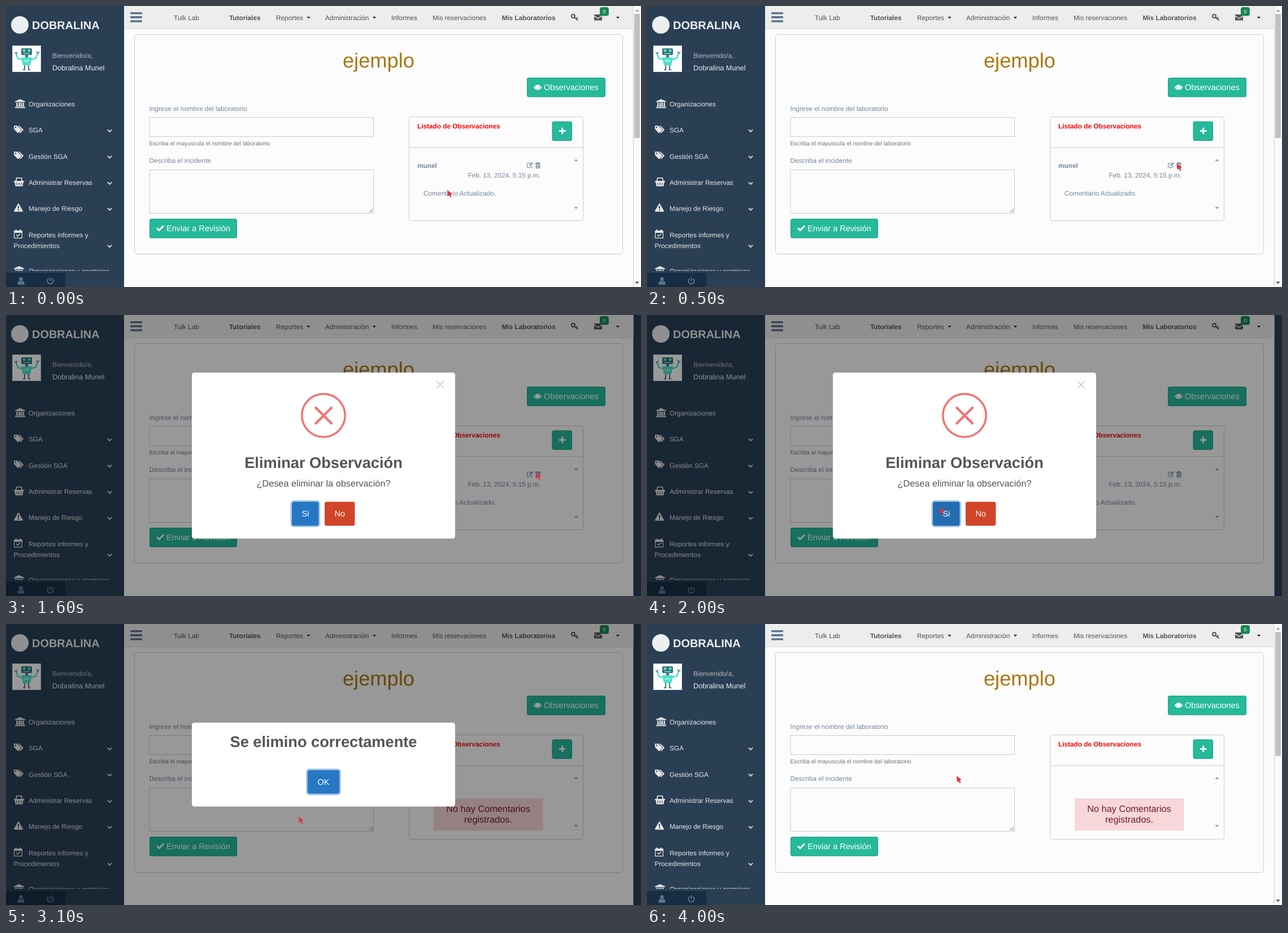
Animation, 1124 px wide and 498 px high, one loop 4.5 s. Source, as an HTML page:

```html
<!DOCTYPE html>
<html lang="es">
<head>
<meta charset="utf-8">
<title>Observaciones</title>
<style>
html, body { margin: 0; width: 100%; height: 100%; overflow: hidden; background: #2a3f54; }
svg { display: block; }
text { font: 11.8px "Liberation Sans", Arial, sans-serif; text-rendering: geometricPrecision; white-space: pre; }
.b { font-weight: bold; }
.mid { text-anchor: middle; }
.muted { fill: #73879c; }
.nav text, .nav path { fill: #515356; }
.menu text, .menu .icon { fill: #e7e7e7; }
.btn rect { fill: #26b99a; stroke: #169f85; }
.btn text { font-size: 14.5px; fill: #fff; }
.line { fill: none; stroke: #ccc; }
.stroke { fill: none; stroke-width: 2; }
.title { font-size: 27.2px; font-weight: bold; fill: #555; text-anchor: middle; }
.body { font-size: 16.3px; text-anchor: middle; }
.choice { font-size: 14.5px; fill: #fff; text-anchor: middle; }
</style>
</head>
<body>
<svg width="1124" height="498" viewBox="0 0 1124 498">
  <defs>
    <path id="bank" fill-rule="evenodd" d="M9 0L18 4V5.3H0V4ZM2.3 6.3H4.7V12H6.2V6.3H8.6V12H9.6V6.3H12V12H13.4V6.3H15.8V12H16.8V13.3H1.2V12H2.3ZM0 14.2H18V16H0Z"/>
    <path id="tags" fill-rule="evenodd" d="M0 1Q0 0 1 0H5.6L12.6 6.6Q13.3 7.4 12.6 8.2L8 12.8Q7.2 13.5 6.4 12.8L0 6ZM3 1.7A1.3 1.3 0 1 0 3 4.3A1.3 1.3 0 1 0 3 1.7ZM7.5 0H9.4L16.4 6.6Q17.2 7.4 16.4 8.2L11.8 12.8Q11 13.5 10.2 12.8L9.7 12.2 14.3 7.4Z"/>
    <path id="basket" fill-rule="evenodd" d="M4.2 0H14L15.2 6H18V8H16.7L15.4 15.5H2.7L1.3 8H0V6H2.8ZM5.5 1.6L4.6 6H13.4L12.6 1.6ZM4.4 9L4.9 13.4H6L5.6 9ZM8.4 9V13.4H9.6V9ZM12.5 9L12.1 13.4H13.2L13.7 9Z"/>
    <path id="warn" fill-rule="evenodd" d="M7.2.6Q8 -.5 8.8 .6L15.9 13Q16.3 14.4 15 14.5H1Q-.3 14.4 .1 13ZM6.8 4.6L7.1 9.3H8.9L9.2 4.6ZM7 10.4V12.5H9V10.4Z"/>
    <path id="calendar" fill-rule="evenodd" d="M0 3Q0 2 1 2H2.6V.7Q3.8 -.6 5 .7V2H10V.7Q11.2 -.6 12.4 .7V2H14Q15 2 15 3V15Q15 16 14 16H1Q0 16 0 15ZM1.2 6V14.8H13.8V6ZM3.6 10L4.8 9 6.7 10.9 10.4 7.2 11.5 8.3 6.7 13.1Z"/>
    <path id="chevron" class="stroke" stroke="#c4cfda" d="M-3.6 -1.8L0 1.8L3.6 -1.8"/>
    <path id="caret" d="M-3 -1.3H3L0 1.7Z"/>
    <path id="up" d="M-3.7 2L0 -2L3.7 2Z"/>
  </defs>

  <rect width="1124" height="498" fill="#2a3f54"/>

  <g class="menu">
    <circle cx="24.5" cy="33.5" r="15.5" fill="#ecf0f1"/>
    <text class="b" x="46" y="41" style="font-size:19.95px;fill:#ecf0f1">DOBRALINA</text>
    <text x="82" y="92" style="fill:#bab8b8">Bienvenido/a,</text>
    <text x="82" y="113.5" style="font-size:12.7px;fill:#ecf0f1">Dobralina Munel</text>

    <rect x="11.5" y="70.5" width="50" height="46" fill="#fff" stroke="#d8dde1"/>
    <g fill="#4fe0cb">
      <path fill="none" stroke="#4fe0cb" stroke-width="2.6" d="M28 95L21 93L18 85M45 95L53 92L56 84"/>
      <path fill="none" stroke="#55727d" stroke-width="1.5" d="M15.5 82L18 85L20 81M54 80L56 84L59 81"/>
      <rect x="27" y="75" width="19" height="12" rx="2" fill="#3d6f78"/>
      <circle cx="32" cy="79" r="2.5"/><circle cx="41" cy="79" r="2.5"/>
      <rect x="31" y="83.5" width="11" height="1.8"/>
      <rect x="34" y="87" width="5" height="4" fill="#55727d"/>
      <path d="M27 91H46L43 105H30Z"/>
      <rect x="32" y="95" width="9" height="4" fill="#8af0e1"/>
      <path fill="none" stroke="#55727d" stroke-width="2" d="M33 105V113H30M40 105V113H43"/>
    </g>

    <g id="menu"></g>
    <svg width="209" height="469.5">
      <use class="icon" href="#bank" x="14" y="461"/>
      <text x="40" y="474">Organizaciones y permisos</text>
    </svg>
    <rect y="473" width="105" height="25" fill="#172d44"/>
    <g fill="#5a738e">
      <circle cx="26.5" cy="484" r="3.4"/>
      <path d="M20.5 494V491Q21 487.5 24 487.3Q26.5 489 29 487.3Q32 487.5 32.5 491V494Z"/>
      <path class="stroke" stroke="#5a738e" d="M75.3 483.2A5.2 5.2 0 1 0 81.7 483.2M78.5 481V487.5"/>
    </g>
  </g>

  <rect x="209" width="901.5" height="498" fill="#fcfcfc"/>
  <g class="nav">
    <rect x="209" width="901.5" height="40" fill="#ededed"/>
    <path d="M209 40.5H1110.5" stroke="#d9dee4"/>
    <g fill="#5a738e">
      <rect x="220" y="11" width="21" height="3.6" rx="1"/>
      <rect x="220" y="18.1" width="21" height="3.6" rx="1"/>
      <rect x="220" y="25.2" width="21" height="3.6" rx="1"/>
    </g>
    <text x="297" y="24.5">Tulk Lab</text>
    <text x="395" y="24.5" class="b">Tutoriales</text>
    <text x="478" y="24.5">Reportes</text>
    <text x="565" y="24.5">Administración</text>
    <text x="682" y="24.5">Informes</text>
    <text x="755" y="24.5">Mis reservaciones</text>
    <text x="877.5" y="24.5" class="b">Mis Laboratorios</text>
    <use href="#caret" x="535.5" y="20.5"/>
    <use href="#caret" x="652" y="20.5"/>
    <use href="#caret" x="1083" y="20.5"/>
    <g fill="none" stroke="#515356" stroke-width="2">
      <circle cx="1004" cy="18" r="3"/>
      <path style="fill:none" d="M1006 20L1012.5 25.5M1009 22.5L1011.5 20"/>
    </g>
    <path d="M1041 15H1055V16.5L1048 21.5L1041 16.5ZM1041 18.2L1048 23L1055 18.2V25.5H1041Z"/>
    <rect x="1051" y="2" width="16" height="15.5" rx="4" fill="#198754"/>
    <text x="1059" y="12.8" class="mid" style="font-size:8.8px;fill:#fff">0</text>
  </g>

  <rect id="panel" class="line" x="227.5" y="50.5" width="864" height="389" rx="5"/>
  <text x="659.5" y="109" class="mid" style="font-size:36.3px;fill:#a9780f">ejemplo</text>

  <g class="btn">
    <rect x="922.5" y="127.5" width="138" height="33.5" rx="2.5"/>
    <path fill="#fff" fill-rule="evenodd" d="M933.5 144.2Q941 134.8 948.5 144.2Q941 153.6 933.5 144.2ZM935.5 144.2Q941 150.8 946.5 144.2Q944.8 142 943.8 141.6A3.8 3.8 0 1 1 938.2 141.6Q936.8 142.3 935.5 144.2Z"/>
    <circle cx="941" cy="143.5" r="1.6" fill="#fff"/>
    <text x="952" y="149">Observaciones</text>
    <rect x="254.5" y="377.5" width="154" height="33.5" rx="2.5"/>
    <path class="stroke" stroke="#fff" style="stroke-width:3" d="M267 393.5L271 397.5L279 389.5"/>
    <text x="284" y="399">Enviar a Revisión</text>
  </g>

  <text x="253.5" y="185.5" class="muted">Ingrese el nombre del laboratorio</text>
  <rect class="line" x="254" y="197.5" width="396.5" height="34"/>
  <text x="253.5" y="246.5" style="font-size:10.3px;fill:#6c757d">Escriba el mayuscula el nombre del laboratorio</text>
  <text x="253.5" y="278" class="muted">Describa el incidente</text>
  <rect class="line" x="254" y="290.5" width="396.5" height="77"/>
  <path d="M642.5 366L649 359.5M646.5 366L649 363.5" stroke="#666"/>

  <rect id="card" class="line" x="713.5" y="196.5" width="308" height="184" rx="4"/>
  <path class="line" d="M713.5 251H1021.5"/>
  <text x="728" y="217" class="b" fill="#f00">Listado de Observaciones</text>
  <g class="btn">
    <rect x="967" y="205" width="34.5" height="33.5" rx="2.5"/>
    <path d="M979 221.3H990.4M984.7 215.6V227" stroke="#fff" stroke-width="2.8"/>
  </g>
  <g fill="#a5a5a5">
    <use href="#up" x="1009" y="273"/>
    <use href="#up" transform="translate(1009 358)scale(1 -1)"/>
  </g>

  <g id="comment" class="muted">
    <text x="728" y="286.5" class="b">munel</text>
    <g fill="none" stroke="#73879c" stroke-width="1.1">
      <path d="M929 278.5H924Q922.6 278.5 922.6 280V285Q922.6 286.5 924 286.5H929.5Q931 286.5 931 285V283.5"/>
      <path stroke-width="2.2" d="M926.5 283.5L932.5 277.8"/>
      <path d="M937 279.3H946M940 279V277.6H943V279M938.4 279.5V287H944.6V279.5M940.4 281V285.5M942.6 281V285.5" stroke-width="1.4"/>
    </g>
    <text x="946" y="303.5" text-anchor="end">Feb. 13, 2024, 5:15 p.m.</text>
    <text x="739" y="335.5">Comentario Actualizado.</text>
  </g>
  <g id="empty" fill="#721c24">
    <rect x="757" y="309" width="193.5" height="57" fill="#f8d7da"/>
    <text x="853.5" y="333" class="body">No hay Comentarios</text>
    <text x="853.5" y="352" class="body">registrados.</text>
  </g>

  <g id="scrollbar">
    <rect x="1110.5" width="13.5" height="498" fill="#fafafa"/>
    <rect x="1112" y="14" width="10" height="220" fill="#c1c1c1"/>
    <use href="#up" x="1117" y="8" fill="#a3a3a3"/>
    <use href="#up" transform="translate(1117 490.5)scale(1 -1)" fill="#505050"/>
  </g>

  <rect id="shade" width="1124" height="498" opacity=".4"/>

  <g id="ask">
    <rect x="329" y="102" width="466" height="294.3" rx="4.5" fill="#fff"/>
    <path d="M762 117L775 130M775 117L762 130" stroke="#ccc" stroke-width="1.6"/>
    <g fill="none" stroke="#f27474">
      <circle cx="562" cy="178" r="38.2" stroke-width="3.6"/>
      <path d="M548.5 164.5L576 192M576 164.5L548.5 192" stroke-width="4.4" stroke-linecap="round"/>
    </g>
    <text x="562" y="271" class="title">Eliminar Observación</text>
    <text x="562" y="304" class="body" fill="#545454">¿Desea eliminar la observación?</text>
    <rect x="504.7" y="329.7" width="50.2" height="45" rx="5" fill="none" stroke="#a9c9e7" stroke-width="2.7"/>
    <rect id="yes" x="506" y="331" width="47.6" height="42.4" rx="3.5"/>
    <text x="530" y="357" class="choice">Si</text>
    <rect x="564" y="331" width="53.4" height="42.4" rx="3.5" fill="#d14529"/>
    <text x="590.7" y="357" class="choice">No</text>
  </g>

  <g id="done">
    <rect x="329" y="174.7" width="466" height="148.8" rx="4.5" fill="#fff"/>
    <text x="562" y="218" class="title">Se elimino correctamente</text>
    <rect x="532.4" y="257.5" width="59.2" height="44.6" rx="5" fill="none" stroke="#a9c9e7" stroke-width="2.7"/>
    <rect id="ok" x="533.7" y="258.8" width="56.6" height="42" rx="3.5"/>
    <text x="562" y="285" class="choice">OK</text>
  </g>

  <path id="pointer" fill="#dc3545" d="M0 0L.9 11.4L3.2 9.3L5.7 13.3L7.7 12.2L5.6 8.2L8.8 7.2Z"/>
</svg>
<script>
const el = id => document.getElementById(id);
const show = (id, on) => el(id).style.display = on ? '' : 'none';

// icon, icon x, icon y, label, chevron y
const menu = [
  ['bank', 16, 165, 'Organizaciones'],
  ['tags', 14, 212, 'SGA', 221],
  ['tags', 14, 258, 'Gestión SGA', 267.5],
  ['basket', 14, 304, 'Administrar Reservas', 314],
  ['warn', 14, 350, 'Manejo de Riesgo', 360],
  ['calendar', 14, 396, 'Reportes informes y', 425.5]
];
el('menu').innerHTML = menu.map(([icon, x, y, label, chevron], i) =>
  `<use class="icon" href="#${icon}" x="${x}" y="${y}"/>
   <text x="40" y="${178 + 46.3 * i}">${label}</text>` +
  (chevron ? `<use href="#chevron" x="183.5" y="${chevron}"/>` : '')
).join('') + '<text x="13.5" y="428.5">Procedimientos</text>';

// start time, pointer x, pointer y, dialog, hovered, comment deleted
const steps = [
  [0, 781, 326, '', false, false],
  [500, 938, 279, '', false, false],
  [1000, 938, 279, 'ask', false, false],
  [2000, 518, 341, 'ask', true, false],
  [2500, 518, 341, 'done', false, true],
  [3500, 548, 269, 'done', true, true],
  [4000, 548, 269, '', false, true]
];

function draw() {
  const t = performance.now() % 4500;
  const [, x, y, dialog, hover, deleted] = steps.findLast(step => step[0] <= t);
  el('pointer').setAttribute('transform', `translate(${x} ${y})`);
  show('ask', dialog === 'ask');
  show('done', dialog === 'done');
  show('shade', dialog);
  show('scrollbar', !dialog);
  show('comment', !deleted);
  show('empty', deleted);
  for (const id of ['yes', 'ok']) el(id).setAttribute('fill', hover ? '#236cb0' : '#2778c4');
  el('panel').setAttribute('height', deleted ? 390 : 389);
  el('card').setAttribute('height', deleted ? 185 : 184);
  requestAnimationFrame(draw);
}
draw();
</script>
</body>
</html>
```
